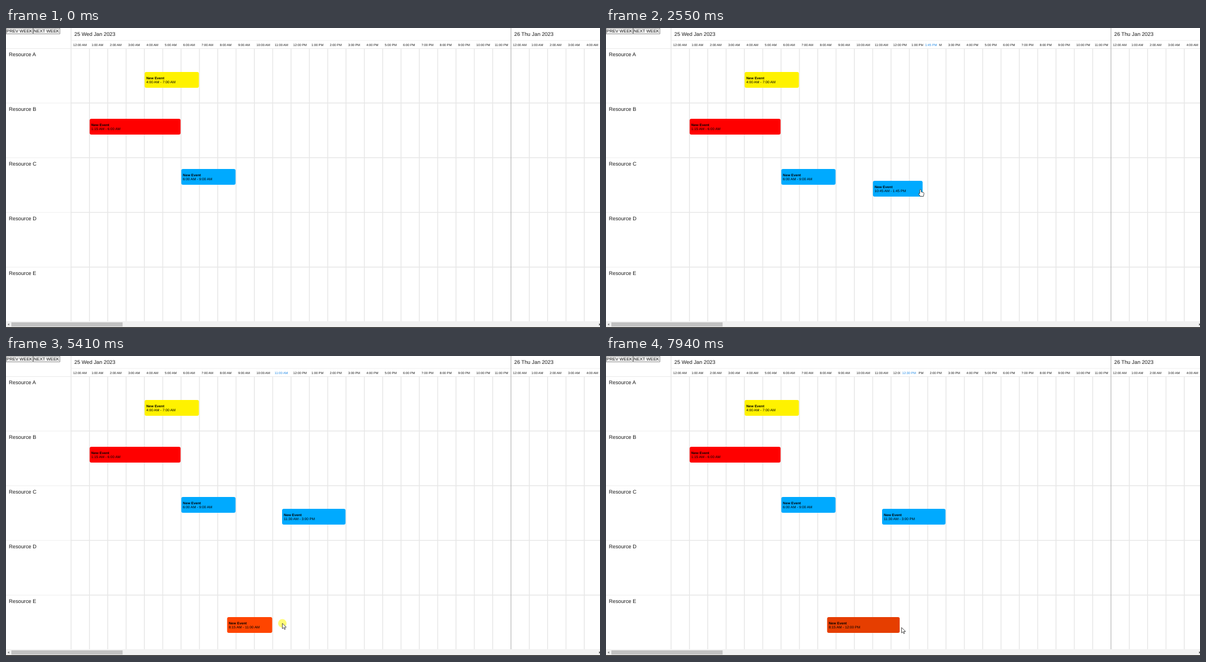
An HTML page that plays this animation: 1052 px wide and 532 px high, repeating every 8000 ms.

```html
<!DOCTYPE html>
<html lang="en">
<head>
<meta charset="utf-8">
<title>Resource scheduler</title>
<style>
html, body { margin: 0; width: 100%; height: 100%; overflow: hidden; background: #fff; }
svg { position: absolute; left: 0; top: 0; overflow: hidden; font-family: "Liberation Sans", Arial, sans-serif; text-rendering: geometricPrecision; }
text { fill: #1a1a1a; }
.event text { fill: #000; font-size: 6.3px; }
.event .title { font-weight: bold; }
.event circle { fill: #e4e4e4; stroke: #bbb; stroke-width: .8; }
#label text { fill: #1e88e5; font-size: 5.7px; }
</style>
</head>
<body>
<svg id="stage" width="1052" height="532" viewBox="0 0 1052 532"></svg>
<script>
const LOOP = 8000, TICK = 70, LEFT = 115.3, HOUR = 32.46, QUARTER = HOUR / 4;
const stage = document.getElementById('stage');
const xOf = q => LEFT + q * QUARTER;
const cell = q => Math.floor(q - 1.48);   // the time label trails the pointer

function clock(q) {
  const h = Math.floor(q / 4) % 24;
  const min = String((q % 4) * 15).padStart(2, '0');
  return `${h % 12 || 12}:${min} ${h < 12 ? 'AM' : 'PM'}`;
}

function set(node, attrs) {
  for (const k in attrs) node.setAttribute(k, attrs[k]);
  return node;
}

function add(tag, attrs, parent = stage, content = '') {
  const node = document.createElementNS('http://www.w3.org/2000/svg', tag);
  node.textContent = content;
  return parent.appendChild(set(node, attrs));
}

const show = (node, on) => { node.style.display = on ? 'inline' : 'none'; };
const rect = (x, y, width, height, fill) => add('rect', { x, y, width, height, fill });
const write = (x, y, size, s) => add('text', { x, y, 'font-size': size }, stage, s);
const line = (x1, y1, x2, y2, stroke, width = 1.5) =>
  add('path', { d: `M${x1} ${y1}L${x2} ${y2}`, stroke, 'stroke-width': width });

function drawGrid() {
  line(LEFT, 22, 1052, 22, '#eee', 1);
  line(0, 36.5, 1052, 36.5, '#e9e9e9', 1);
  [...'ABCDE'].forEach((name, i) => {
    const y = 36 + 97 * i;
    write(5, y + 14.4, 9.3, 'Resource ' + name);
    if (!i) return;
    line(0, y, LEFT, y, '#eee', 1);
    line(LEFT, y, 1052, y, '#e7e7e7');
  });
  for (let h = 0; h < 29; h++) {
    const x = xOf(h * 4);
    if (h !== 24) line(x, h ? 37 : 0, x, 520, '#e7e7e7');
    write(x + 3.7, 31.5, 5.7, clock(h * 4));
  }
  line(xOf(96), 0, xOf(96), 520, '#b4b4b4', 1.1);
  write(121, 13.8, 9.3, '25 Wed Jan 2023');
  write(900, 13.8, 9.3, '26 Thu Jan 2023');

  ['PREV WEEK', 'NEXT WEEK'].forEach((s, i) => {
    set(rect(i * 48 + .3, .3, 47.2, 10.2, '#f4f4f4'), { stroke: '#666', 'stroke-width': .7 });
    write(1 + i * 48, 8.2, 7.7, s);
  });

  rect(0, 520, 1052, 10.7, '#f1f1f1');
  rect(9.5, 522, 197, 7.5, '#c1c1c1');
  add('path', { d: 'M5.6 523.8V527.8L3 525.8Z', fill: '#777' });
  add('path', { d: 'M1050.5 523.8V527.8L1053 525.8Z', fill: '#333' });
  rect(0, 530.7, 1052, 1.3, '#000');
}

// Returns a function that redraws the event in a given state.
function addEvent(y, color, dark) {
  const g = add('g', { class: 'event' });
  const box = add('rect', { y: y + .1, height: 27.8, rx: 3 }, g);
  const title = add('text', { class: 'title' }, g);
  const second = add('text', {}, g);
  const grips = [0, 1].map(() => add('circle', { cy: y + 14.4, r: 3.6 }, g));
  return ({ start, end, from = start, to = end, hover, grip }) => {
    const x = xOf(start) + .4, right = xOf(end) - .9, narrow = right - x < 36;
    show(g, end > start);
    set(box, { x, width: Math.max(0, right - x), fill: hover ? dark : color });
    set(title, { x: x + 2.9, y: y + (narrow ? 9.7 : 13.1) });
    set(second, { x: x + 2.9, y: y + (narrow ? 16.7 : 20.2), class: narrow ? 'title' : '' });
    title.textContent = narrow ? 'New' : 'New Event';
    second.textContent = narrow ? 'Event' : `${clock(from)} - ${clock(to)}`;
    grips.forEach((c, i) => { set(c, { cx: i ? right : x }); show(c, grip); });
  };
}

// Pointer script: action, event, begin, finish, quarter hour reached, y reached
const SCRIPT = [
  ['move', '', 130, 890, 47.3, 277],
  ['move', '', 960, 1320, 45, 271],
  ['create', 'blue', 1520, 2290, 57, 286],
  ['over', 'blue', 2420, 2740, 50.1, 286],
  ['drag', 'blue', 2740, 3180, 59.2, 287],
  ['drag', 'blue', 3250, 3460, 55.3, 288],
  ['over', 'blue', 3530, 3950, 49, 286],
  ['start', 'blue', 3990, 4440, 46, 286],
  ['move', '', 4470, 4920, 35.1, 463],
  ['create', 'orange', 4990, 5410, 46.1, 474],
  ['over', 'orange', 5480, 5690, 44, 477.5],
  ['end', 'orange', 5760, 6130, 48, 477.5],
  ['end', 'orange', 6270, 6980, 44, 477.5],
  ['end', 'orange', 7180, 7640, 50.1, 478],
  ['over', 'orange', 7720, 7930, 50.3, 481.5]
];

// Replays the script up to time t.
function stateAt(t) {
  const events = { blue: { start: 44, end: 44, from: 43 }, orange: { start: 34, end: 34, from: 33 } };
  const s = { events, q: 109.7, y: 523, label: 0, action: '' };
  for (const [action, name, begin, finish, q, y] of SCRIPT) {
    if (t < begin) break;
    const k = Math.min(1, (t - begin) / (finish - begin)), q0 = s.q, ev = events[name];
    s.action = action;
    s.q += (q - s.q) * k;
    s.y += (y - s.y) * k;
    for (const e of Object.values(events)) e.hover = e.grip = false;

    if (action === 'move') s.label = cell(s.q);
    if (action === 'create') s.label = ev.end = cell(s.q);
    if (action === 'drag') {
      const shift = Math.round(s.q - q0);
      ev.start += shift;
      ev.end += shift;
    }
    if (action === 'start' || action === 'end') s.label = ev[action] = Math.round(s.q);
    if (action === 'drag' || action === 'start') ev.from = ev.start;
    if (ev) {
      ev.touched = ev.touched || (action !== 'create' && action !== 'over');
      ev.hover = ev.touched;
      ev.grip = ev.touched && s.q < ev.end + .25 || action === 'end';
      s.inside = s.q > ev.start + .3 && s.q < ev.end - .05;
    }
  }
  events.orange.to = Math.min(events.orange.end, 48);
  return s;
}

drawGrid();
addEvent(78, '#fff200')({ start: 16, end: 28 });
addEvent(161, '#ff0000')({ start: 4, end: 24, from: 5 });
addEvent(250, '#00aaff')({ start: 24, end: 36 });
const draw = {
  blue: addEvent(271, '#00aaff', '#0099e5'),
  orange: addEvent(463, '#ff4500', '#e63e00')
};
const label = add('g', { id: 'label' });
const plate = add('rect', { y: 25, height: 10, fill: '#fff' }, label);
const time = add('text', { x: 3.5, y: 31.5 }, label);
const press = add('circle', { r: 7.5, fill: '#fff80a', 'fill-opacity': .55 });
const cursor = add('g', { fill: '#fff', stroke: '#222', 'stroke-width': .8, 'stroke-linejoin': 'round' });
const arrow = add('path', { d: 'M0 0V9.6L2.3 7.5 3.8 11 5.4 10.3 3.9 7H7Z' }, cursor);
const hand = add('path', { d: 'M-1.2 1Q0-.8 1.2 1V4.6L5.3 5.6Q6.5 6 6.3 7.8L5.4 12.5H-.3L-3.4 8Q-3 6.4-1.2 7.8Z' }, cursor);

function render(now) {
  const t = Math.floor((now % LOOP - 20) / TICK) * TICK + 20;
  const s = stateAt(t);
  for (const name in draw) draw[name](s.events[name]);

  show(label, s.action);
  set(label, { transform: `translate(${xOf(s.label)})` });
  time.textContent = clock(s.label);
  set(plate, { width: time.getComputedTextLength() + 7 });

  const at = { transform: `translate(${xOf(s.q)} ${s.y})` };
  show(cursor, s.action);
  set(cursor, at);
  set(press, at);
  show(press, ['create', 'drag', 'start', 'end'].includes(s.action));
  const pointing = s.action === 'drag' || s.action === 'over' && s.inside;
  show(hand, pointing);
  show(arrow, !pointing);
}

function tick() {
  render(performance.now());
  requestAnimationFrame(tick);
}
tick();
</script>
</body>
</html>
```
